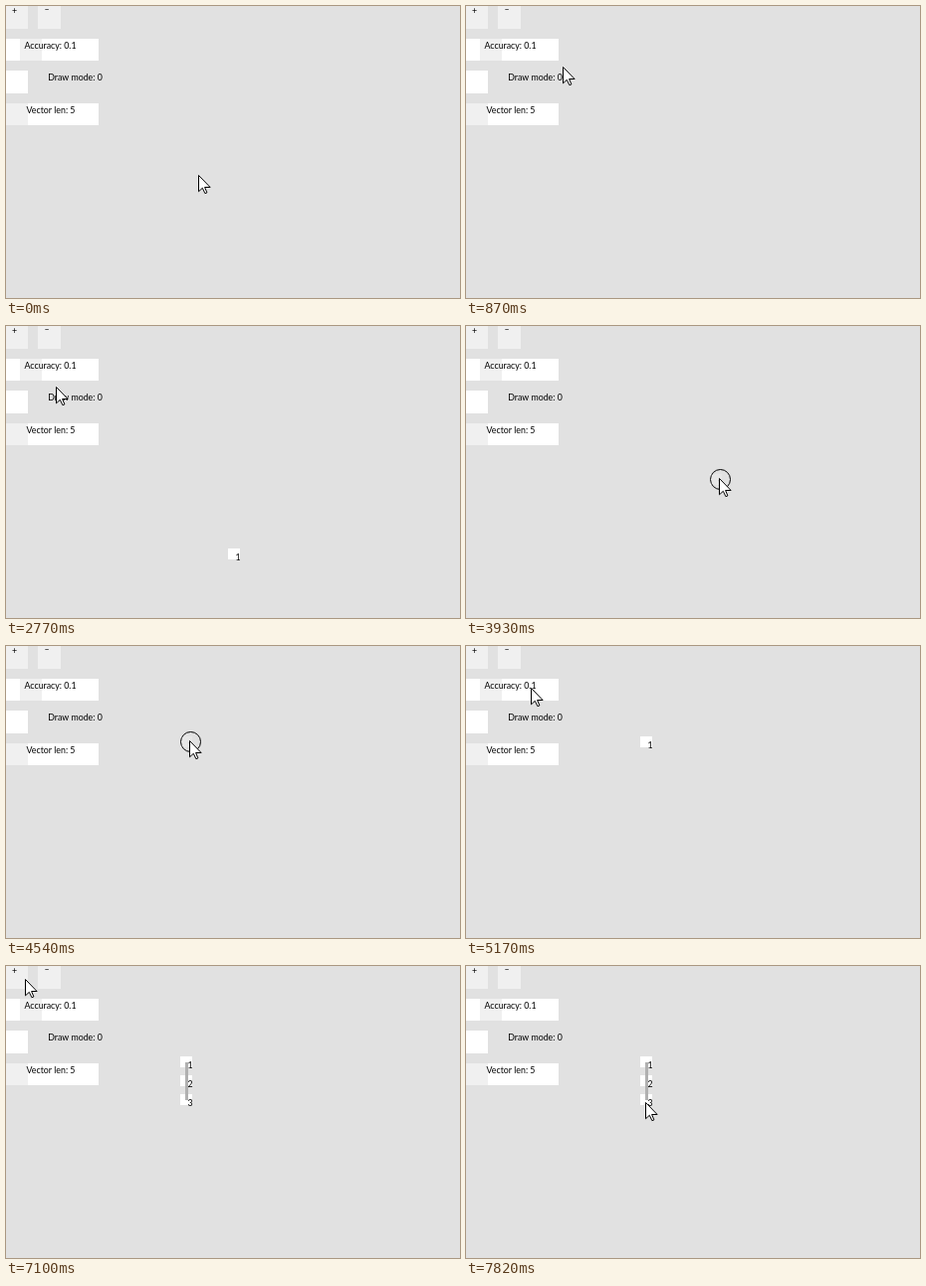
Animation, 456 px wide and 294 px high, one loop 7.99 s. Source, as an HTML page with a canvas:

```html
<!DOCTYPE html>
<html lang="en">
<head>
<meta charset="utf-8">
<title>Node editor</title>
<style>
html, body { margin: 0; width: 100%; height: 100%; overflow: hidden; background: #e1e1e1; }
canvas { display: block; }
</style>
</head>
<body>
<canvas id="stage" width="456" height="294"></canvas>
<script>
const ctx = document.getElementById('stage').getContext('2d');
const LOOP = 7990, STEP = 89;
const BG = '#e1e1e1', BUTTON = '#f0f0f0', WHITE = '#fff', INK = '#000';
const GRAB = 3750, DROP = 4540, RELEASE = 4630;
const clicks = [2130, 5710, 6630];

// The pointer glides from each stop to the next; a bend curves the way
const home = [193, 170];
const glides = [
  { from: 90, to: 870, end: [97, 61] },
  { from: 960, to: 1680, bend: [213, 120], end: [21, 29] },
  { from: 1770, to: 1950, end: [13, 13] },
  { from: 2580, to: 3290, bend: [75, 103], end: [212, 215] },
  { from: 3380, to: 3570, end: [231, 228] },
  { from: 3840, to: 3930, end: [254, 153] },
  { from: 4020, to: DROP, bend: [250, -12], end: [184, 95] },
  { from: RELEASE, to: 5340, bend: [165, 132], end: [34, 15] },
  { from: 5430, to: 5610, end: [13, 9] },
  { from: 7100, to: 7820, end: [180, 137] }
];

const ease = u => u * u * (3 - 2 * u);

function progress(t, { from, to }) {
  const gaps = Math.round((to - from) / STEP);
  const step = Math.floor((t - from) / (to - from) * gaps + 0.05) + 1;
  return ease(Math.min(1, step / (gaps + 1)));
}

function pointer(t) {
  let pos = home;
  for (const glide of glides) {
    if (t < glide.from) break;
    const s = progress(t, glide), r = 1 - s;
    const { bend, end } = glide;
    pos = pos.map((a, i) => {
      const mid = bend ? bend[i] : (a + end[i]) / 2;
      return a * r * r + 2 * mid * r * s + end[i] * s * s;
    });
  }
  return pos.map(Math.round);
}

function rect(x, y, w, h, color) {
  ctx.fillStyle = color;
  ctx.fillRect(x, y, w, h);
}

function label(text, x, y, align = 'center') {
  ctx.font = '8.8px Lato, sans-serif';
  ctx.textAlign = align;
  ctx.fillStyle = INK;
  ctx.fillText(text, x, y);
}

function outline(shape, fill) {
  ctx.fillStyle = fill;
  ctx.fill(shape);
  ctx.lineWidth = 1;
  ctx.strokeStyle = INK;
  ctx.stroke(shape);
}

function panel() {
  rect(0, 0, 22, 23, BUTTON);
  rect(32, 0, 23, 23, BUTTON);
  label('+', 8.5, 8);
  label('–', 41, 6);

  const rowY = i => Math.floor(33 + 32.5 * i);
  rect(0, rowY(0), 93, 22, WHITE);
  rect(14, rowY(0), 22, 22, BUTTON);
  rect(0, rowY(1), 22, 23, WHITE);
  rect(0, rowY(2), 93, 22, WHITE);
  rect(0, rowY(2), 22, 22, BUTTON);
  label('Accuracy: 0.1', 44.5, rowY(0) + 10);
  label('Draw mode: 0', 69.5, rowY(1) + 10);
  label('Vector len: 5', 45, rowY(2) + 10);
}

function nodes(t, [px, py]) {
  const count = clicks.filter(ms => t >= ms).length;
  if (!count) return;
  let x = 175, y = 91;
  if (t < GRAB) [x, y] = [223, 224];
  else if (t < DROP) [x, y] = [px - 9, py - 4];
  const gap = 19;
  for (let i = 0; i < count; i++) rect(x, y + i * gap, 12, 11, WHITE);
  rect(x + 5, y + 6, 3, (count - 1) * gap, '#b0b0b0');
  for (let i = 0; i < count; i++) label(i + 1, x + 12.5, y + i * gap + 12, 'right');
}

function ring(x, y) {
  const circle = new Path2D();
  circle.arc(x + 1.5, y + 1.5, 10, 0, Math.PI * 2);
  outline(circle, 'rgba(225, 225, 225, 0.8)');
}

const arrow = new Path2D('M0 0V16.3L3.8 12.8L6.4 18.2L8.4 17.4L6.1 12H11.6Z');
function cursor(x, y) {
  ctx.save();
  ctx.translate(x + 0.5, y + 0.5);
  outline(arrow, WHITE);
  ctx.restore();
}

function draw(t) {
  const pos = pointer(t);
  const held = t >= GRAB && t < RELEASE;
  const clicked = clicks.some(ms => t >= ms && t < ms + STEP);
  rect(0, 0, 456, 294, BG);
  panel();
  nodes(t, pos);
  if (held || clicked) ring(...pos);
  cursor(...pos);
}

const start = performance.now();
function tick() {
  draw((performance.now() - start) % LOOP);
  requestAnimationFrame(tick);
}
tick();
</script>
</body>
</html>
```
